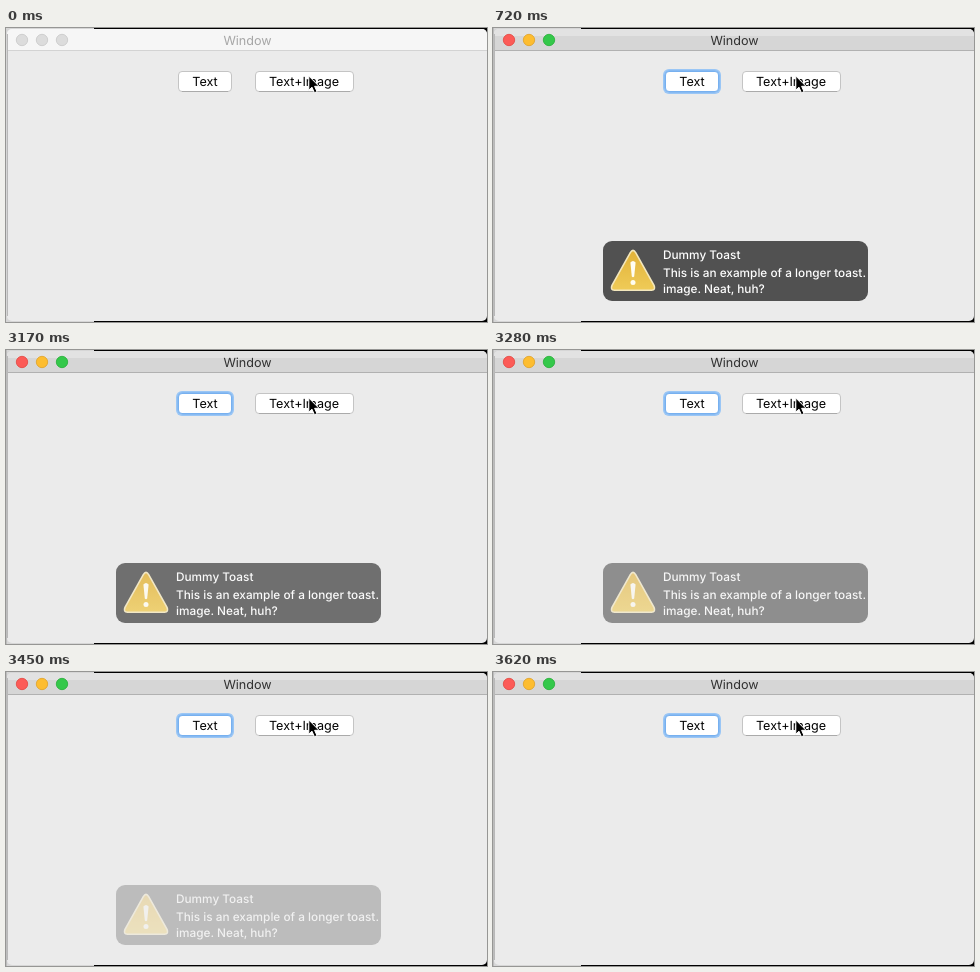
An HTML page that plays this animation: 481x294 px, repeating every 5.41 s.

```html
<!DOCTYPE html>
<html lang="en">
<head>
<meta charset="utf-8">
<title>Window</title>
<style>
  html, body { margin: 0; width: 100%; height: 100%; overflow: hidden; background: #ebebeb; }
  svg { display: block; width: 481px; height: 294px; }
  text { font: 12.6px Inter, Roboto, sans-serif; text-rendering: geometricPrecision; }
  .mid { text-anchor: middle; }
  #toast text { font-size: 11.8px; font-weight: 500; fill: #fff; }
  .btn { fill: #fff; stroke: #c4c4c4; }
  .lights { stroke-width: .8; }
</style>
</head>
<body>
<svg viewBox="0 0 481 294">
  <defs>
    <linearGradient id="blue" x2="0" y2="1">
      <stop stop-color="#4f9cf9"/><stop offset="1" stop-color="#0a62e6"/>
    </linearGradient>
    <linearGradient id="gold" x2="0" y2="1">
      <stop stop-color="#e2b238"/><stop offset="1" stop-color="#efcb58"/>
    </linearGradient>
    <clipPath id="frame"><rect x="1" y="1" width="480" height="292" rx="5"/></clipPath>
    <clipPath id="toastBox"><rect x="110" y="213" width="265" height="60"/></clipPath>
  </defs>

  <rect width="481" height="294"/>
  <rect width="88" height="294" fill="#d6d6d6"/>
  <rect id="edge" width="1" height="294"/>

  <g clip-path="url(#frame)">
    <rect width="481" height="294" fill="#ebebeb"/>
    <rect id="barTop" width="481" height="8"/>
    <rect id="barLow" y="8" width="481" height="14"/>
    <rect id="barLine" y="22" width="481" height="1"/>
    <path d="M1.5 6V288" stroke="#b8b8b8"/>
  </g>
  <g class="lights">
    <circle cx="16" cy="12" r="5.7"/>
    <circle cx="36" cy="12" r="5.7"/>
    <circle cx="56" cy="12" r="5.7"/>
  </g>
  <text id="title" class="mid" x="241.5" y="17">Window</text>

  <g id="ring">
    <rect x="170" y="41" width="58" height="25" rx="6" fill="#9ac6f5"/>
    <rect x="171.5" y="42.5" width="55" height="22" rx="5" fill="#77b0ef"/>
  </g>
  <rect id="first" class="btn" x="172.5" y="43.5" width="53" height="20" rx="3.5"/>
  <path id="firstBase" d="M176 63.5H222" stroke="#aaa"/>
  <text class="mid" x="199" y="58">Text</text>

  <rect class="btn" x="249.5" y="43.5" width="98" height="20" rx="3.5"/>
  <path d="M253 63.5H344" stroke="#aaa"/>
  <rect id="pressed" x="249.5" y="43.5" width="98" height="20" rx="3.5" fill="url(#blue)" stroke="#1d66cf"/>
  <text id="label" class="mid" x="298" y="58">Text+Image</text>

  <g id="toast" clip-path="url(#toastBox)">
    <rect x="110" y="213" width="265" height="60" rx="9" fill="#515151"/>
    <path d="M137.3 224.6Q140 220.2 142.7 224.6L161 257.4Q163 262.2 158.5 262.2H121.5Q117 262.2 119 257.4Z"
      fill="url(#gold)" stroke="#f3e7bd" stroke-width="1.6"/>
    <path d="M137.4 234.5Q140 231.5 142.6 234.5L141.2 248.5Q140 250 138.8 248.5Z" fill="#fffdf2"/>
    <circle cx="140" cy="254.4" r="2.5" fill="#fffdf2"/>
    <text x="170" y="231">Dummy Toast</text>
    <text x="170" y="249">This is an example of a longer toast.</text>
    <text x="170" y="265">image. Neat, huh?</text>
  </g>

  <path d="M302.8 48V62.2L306 59.2L308.4 64.8L311 63.7L308.6 58.3H313Z"
    stroke="#fff" stroke-width="1" stroke-linejoin="round"/>
</svg>
<script>
  const LOOP = 5410, ACTIVE = 540, RELEASE = 720, FADE = 3120;
  const fadeSteps = [0, 50, 110, 160, 220, 270, 330, 390, 440, 500];
  const $ = id => document.getElementById(id);
  const lights = document.querySelectorAll('.lights circle');
  const fills = ['#fc5b57', '#fdbd30', '#34c84a'];
  const rims = ['#e2463f', '#e0a126', '#25ae37'];

  const fill = (id, colour) => $(id).setAttribute('fill', colour);
  const show = (id, on) => $(id).style.display = on ? '' : 'none';

  function draw(t) {
    const active = t >= ACTIVE, down = active && t < RELEASE;

    fill('edge', active ? '#bdbdbd' : '#d6d6d6');
    fill('barTop', active ? '#e2e2e2' : '#f6f6f6');
    fill('barLow', active ? '#d6d6d6' : '#f6f6f6');
    fill('barLine', active ? '#b1b1b1' : '#d3d3d3');
    fill('title', active ? '#303030' : '#a6a6a6');
    lights.forEach((dot, i) => {
      dot.setAttribute('fill', active ? fills[i] : '#dcdcdc');
      dot.setAttribute('stroke', active ? rims[i] : '#c8c8c8');
    });

    show('ring', active);
    show('firstBase', !active);
    $('first').style.stroke = active ? '#77b0ef' : '';
    show('pressed', down);
    fill('label', down ? '#dceaff' : '#000');

    const steps = fadeSteps.filter(s => t >= FADE + s).length;
    $('toast').setAttribute('opacity', t < RELEASE ? 0 : 1 - steps / 10);
  }

  function tick() {
    draw(performance.now() % LOOP);
    requestAnimationFrame(tick);
  }
  tick();
</script>
</body>
</html>
```
